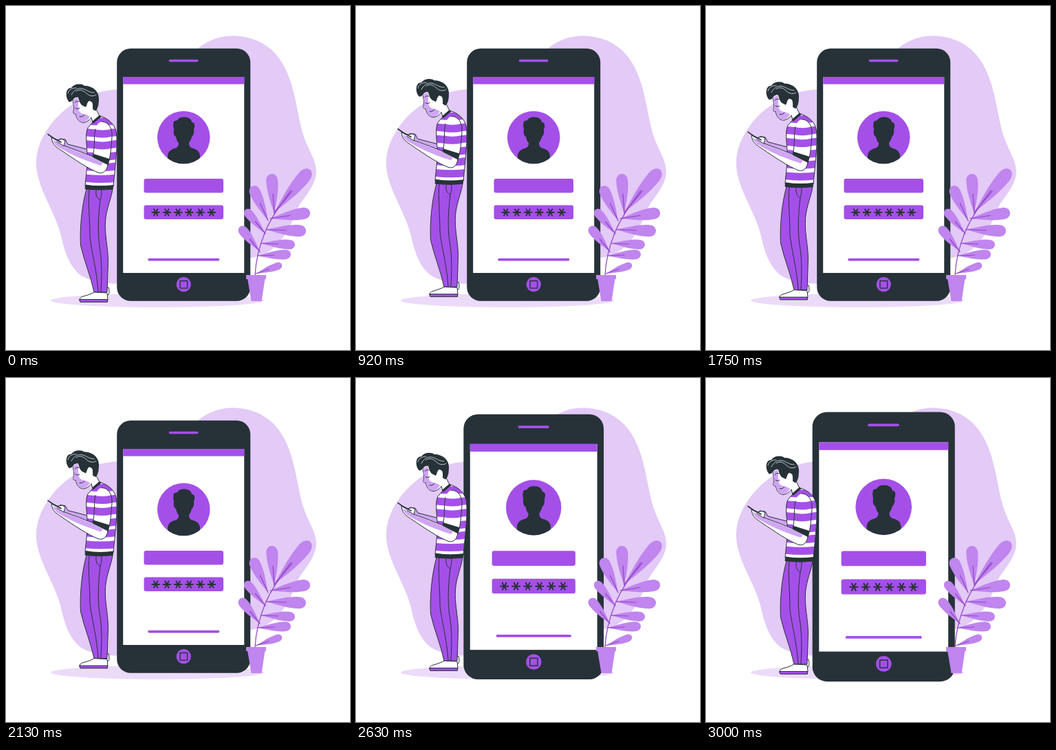
Recreate the animation shown at these times as an HTML page. Size 500 by 500 pixels, loop 3.04 s.

```html
<!DOCTYPE html>
<html lang="en">
<head>
<meta charset="utf-8">
<title>Sign in</title>
<style>
  html, body { margin: 0; width: 100%; height: 100%; overflow: hidden; background: #fff; }
  svg { display: block; width: 100vw; height: 100vh; }
  .ink { fill: #263238; }
  .main { fill: #a450e8; }
  .tint { fill: #d0a5f4; }
  .soft { fill: #c085ee; }
  .white { fill: #fff; }
  .edge { stroke: #263238; stroke-width: 1; stroke-linejoin: round; stroke-linecap: round; }
  .line { fill: none; stroke: #263238; stroke-width: 1; stroke-linecap: round; stroke-linejoin: round; }
  .bar { fill: none; stroke: #a450e8; stroke-width: 3.6; stroke-linecap: round; }
  .vein { fill: none; stroke: #8f45c9; stroke-width: 1.2; stroke-linecap: round; }
  .strand { fill: none; stroke: #e8e8ee; stroke-width: .8; stroke-linecap: round; }
  .stripe { fill: none; stroke: #a450e8; stroke-width: 11; }
  .star { fill: none; stroke: #263238; stroke-width: 1.9; stroke-linecap: round; }
</style>
</head>
<body>
<svg viewBox="0 0 500 500">
  <defs>
    <clipPath id="disc"><circle cx="258.2" cy="191" r="38.3"/></clipPath>
    <clipPath id="torso"><path d="M126 169L137 160C147 163 157 170 160 182C163 199 159 230 156 262L115 262C116 246 119 232 118 213C117 200 115 184 119 177Z"/></clipPath>
    <clipPath id="sleeve"><path d="M139 168C149 168 155 178 154 190C153 205 152 220 148 231L126 220C130 205 127 190 130 179C132 172 135 169 139 168Z"/></clipPath>
  </defs>

  <path fill="#e3caf7" d="M165 121C118 123 82 147 61 178C45 202 41 223 46 246C53 276 72 302 80 334C86 362 95 384 113 394C130 402 150 404 172 404L356 366C372 364 386 356 396 345C416 322 420 300 428 287C441 269 451 256 451 240C450 222 440 211 433 190C424 163 422 128 409 98C398 70 375 46 335 43.500C310 42 288 52 272 68Z"/>
  <ellipse cx="220" cy="428" rx="155" ry="10" fill="#ebdbf8"/>

  <g id="phone">
    <rect class="ink" x="161.200" y="61.800" width="194" height="367" rx="20"/>
    <rect class="white" x="170.200" y="103" width="176" height="285"/>
    <rect class="main" x="170.200" y="103" width="176" height="10.600"/>
    <path class="bar" d="M238.500 79.500H277.700"/>
    <circle class="main" cx="258.200" cy="191" r="38.300"/>
    <path class="ink" clip-path="url(#disc)" d="M243.500 170C244 166 247 167 249 166C251 162 256 161 260 161.500C266 162 270 165 270 169C275 169 275 175 273 179C274 185 272 189 270 190C269 195 267 197 266 199C266 204 268 206 272 207C279 209 282 213 282 219V232H234L235 219C235 213 238 209 245 207C249 206 251 204 251 199C249 197 248 195 247 190C244 189 243 184 244 179C243 176 243 173 243.500 170Z"/>
    <rect class="main" x="200.500" y="251" width="115.500" height="20.600" rx="3"/>
    <rect class="main" x="200.500" y="289.500" width="115.500" height="20.600" rx="3"/>
    <g id="stars"></g>
    <path class="bar" d="M208 368.600H308.500"/>
    <circle class="main" cx="258.300" cy="404.700" r="10.600"/>
    <rect class="line" x="253" y="399.500" width="10.600" height="10.600" style="stroke-width:1.400"/>
  </g>

  <g id="plant">
    <g id="leaves"></g>
    <path class="vein" d="M362 391C363 369 368 350 376 330C384 310 396 293 414 268"/>
    <path class="soft" d="M351 396H376.500L371.500 429H356.500Z"/>
    <rect class="soft" x="349" y="391" width="29" height="6"/>
  </g>

  <g id="man">
    <path class="white edge" d="M143 411L149 409Q151 417 149 419L145 424Z"/>
    <path class="main edge" d="M117 266H155C153 280 146 294 144.500 312C143 332 148 348 148.500 370L147 416H128C123 392 114 372 108.500 348C107 325 110 290 117 266Z"/>
    <path class="line" d="M121 267C119 285 122 310 122 336C124 356 132 384 134 415M131 268C130 276 133 280 137 282C139 277 139 272 139 267M137 282C134 306 133 330 136 350C140 372 139 396 138 415"/>
    <path class="white edge" d="M107 427C107 422 114 422 119 420Q125 418 128 416L147 417L148 427Z"/>
    <path class="main edge" d="M107 426.500H147.500V430.300H108Q106.500 429 107 426.500Z"/>

    <path class="tint edge" d="M121 209L90 201L86 194L79 193L74 196L86 204L122 219Z"/>
    <g clip-path="url(#torso)">
      <rect class="white" x="110" y="155" width="55" height="110"/>
      <g id="torsoStripes"></g>
    </g>
    <path class="line" d="M126 169L137 160C147 163 157 170 160 182C163 199 159 230 156 262L115 262C116 246 119 232 118 213C117 200 115 184 119 177Z"/>
    <path class="ink" d="M115.500 259.500Q136 263 156.500 260L155.500 266.500Q134 269 114.500 266Z"/>

    <path class="white edge" d="M126 219L148 230C147 239 142 244 135 242.500C120 237 98 222 82 211C76 207 69 203 67 196L66 191L73 195L82 193.500L86 196L84 203L106 211Z"/>
    <path class="tint" d="M68 195L74 197L84 204L106 212L126 220L141 228L138 232C120 226 98 218 83 209C75 205 70 201 68 195Z"/>
    <path class="line" d="M74 197L84 203.500"/>
    <path class="line" d="M61 186.500L69 192L80 198" style="stroke-width:1.700"/>

    <g clip-path="url(#sleeve)">
      <rect class="white" x="122" y="164" width="36" height="70"/>
      <g id="sleeveStripes"></g>
      <path class="ink" d="M124 214L153 223L149 233L122 221Z"/>
    </g>
    <path class="line" d="M148 231C152 220 153 205 154 190C155 178 149 168 139 168M130 179C127 190 130 205 126 219"/>

    <path class="white edge" d="M97 135C97 142 100 147 98 153Q97 157.500 101.500 157C102 163 106 169.500 113 169.500C119 168 122 165 124 162L126 169L136 160L131 150L128 133L105 131Z"/>
    <path class="tint" d="M97.600 136L104 133C106 139 104 146 106 152C108 158 116 156 122 161C119 166 116 168 112 169C106 168 103 163 102 156.500Q98 156.500 98.600 153C100 147 97.600 142 97.600 136Z"/>
    <path class="line" d="M101 148.500Q104 151 107 148.500M100 140.500Q103 137 106 139M107 161Q111 162 114 158.500"/>
    <path class="ink" d="M125 168L136 158.500L138.500 161L126.500 171Z"/>
    <path class="ink" d="M90 137C86 130 87 119 95 119C99 113 109 112 114 116C126 116 135 124 135 134C135 143 134 149 130 152.500L126 150C127 142 124 138 121 138C118 139 118 144 116 147L110 144C107 141 106 137 105 133C101 131 98 135 96 138C93 140 91 140 90 137Z"/>
    <path class="white" d="M118 147C118 140 122 137 125 140C127 143 125 149 121 151Z"/>
    <path class="strand" d="M95 129C99 122 104 119 110 120C117 121 120 126 128 126M102 124C107 120 113 123 117 127C121 131 127 132 131 129M90 127C91 121 97 119 102 119"/>
  </g>
</svg>
<script>
  const LOOP = 3040, BOB = 1500, BEAT = 2506;
  const el = id => document.getElementById(id);

  // Six-armed marks of the password field
  el('stars').innerHTML = Array.from({ length: 6 }, (_, i) => {
    const x = 217.6 + i * 16.25, y = 300;
    const arms = [0, 60, 120].map(a =>
      `<path class="star" d="M-5.300 0H5.300" transform="translate(${x} ${y}) rotate(${a})"/>`);
    return arms.join('');
  }).join('');

  const stripes = (x, ys, w, sag) => ys.map(y =>
    `<path class="stripe" d="M${x} ${y}q${w / 2} ${sag} ${w} 0"/>`).join('');
  el('torsoStripes').innerHTML = stripes(110, [166, 183, 200, 217, 232.5, 249.5], 55, 4);
  el('sleeveStripes').innerHTML = stripes(122, [183, 200], 36, 6);

  // Each leaf: base, tip, half width
  const leaves = [
    [390, 300, 442, 238, 9.5], [390, 302, 386, 244, 8.5], [381, 312, 358, 262, 8],
    [377, 331, 348, 296, 6.5], [369, 357, 340, 321, 7], [384, 309, 442, 300, 8.5],
    [378, 325, 436, 327, 8.5], [371, 345, 420, 347, 7], [366, 363, 414, 361, 7],
    [363, 389, 401, 376, 5.5]
  ];
  el('leaves').innerHTML = leaves.map(([x, y, tx, ty, h]) => {
    const len = Math.hypot(tx - x, ty - y);
    const turn = Math.atan2(ty - y, tx - x) * 180 / Math.PI;
    const a = len * .35, b = len * .55, c = len * .82, e = len * 1.06;
    return `<g transform="translate(${x} ${y}) rotate(${turn})">
      <path class="soft" d="M0 0C${a} ${-h * .6} ${b} ${-h} ${c} ${-h}C${e} ${-h} ${e} ${h} ${c} ${h}C${b} ${h} ${a} ${h * .6} 0 0Z"/>
      <path class="vein" d="M0 0H${len * .5}"/></g>`;
  }).join('');

  // Linear rise and fall of the man
  const lift = t => {
    const p = (t % BOB) / BOB;
    return t > 2 * BOB ? 0 : -10 * (1 - Math.abs(1 - 2 * p));
  };

  // Quick swell, slow release, cut by the end of the loop
  const swell = t => {
    const s = t - BEAT;
    if (s <= 0) return 1;
    return 1 + .1 * (s < 250 ? s / 250 : 1 - (s - 250) / 750);
  };

  const start = performance.now();
  function draw(now) {
    const t = Math.max(0, now - start) % LOOP;
    el('man').setAttribute('transform', `translate(0 ${lift(t)})`);
    el('phone').setAttribute('transform',
      `translate(258.2 245.3) scale(${swell(t)}) translate(-258.2 -245.3)`);
    requestAnimationFrame(draw);
  }
  draw(start);
</script>
</body>
</html>
```
